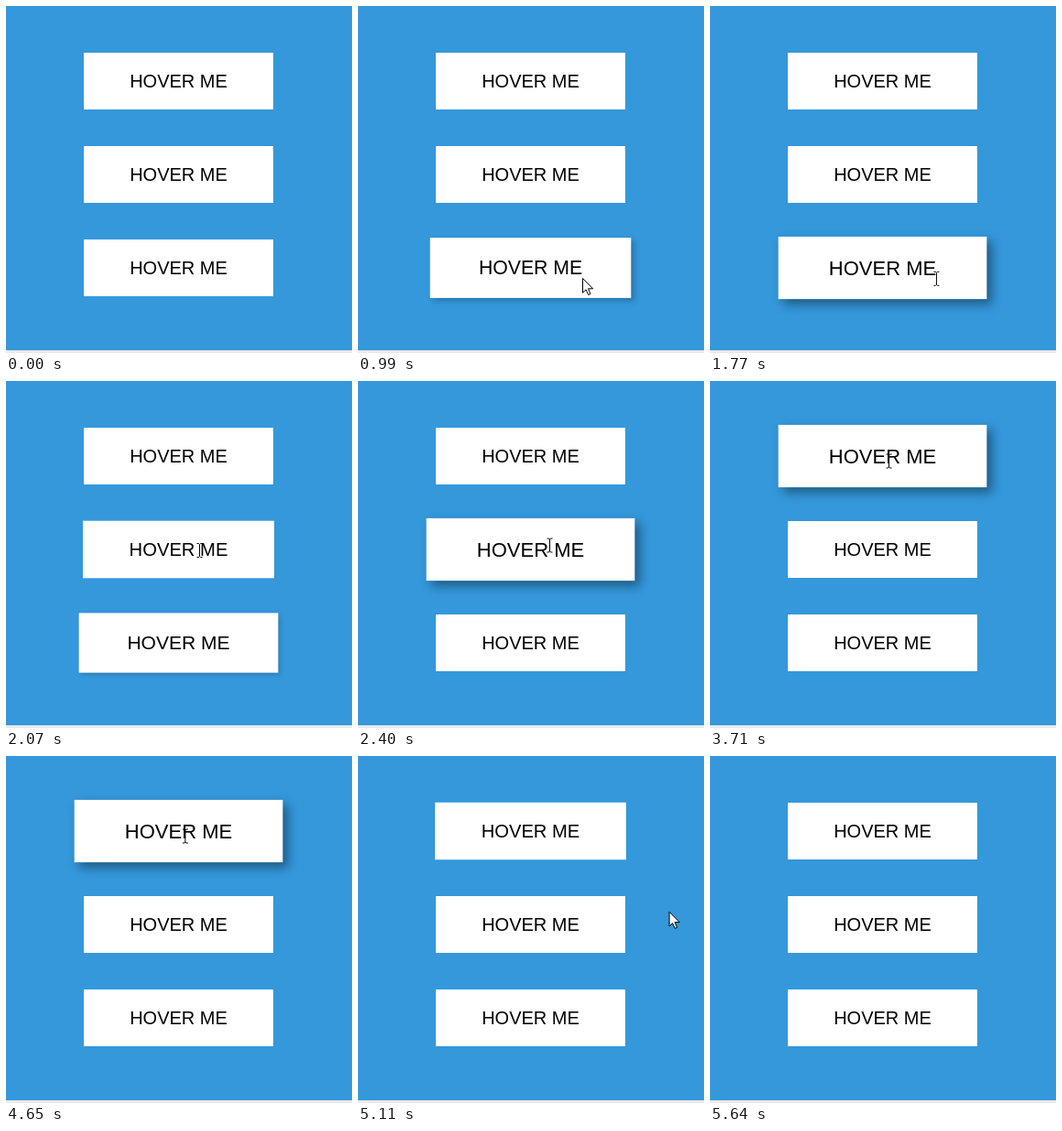
These frames come from a looping animation (378 px wide and 379 px high, 6.27 s). An HTML page:

```html
<!DOCTYPE html>
<html lang="en">
<head>
<meta charset="utf-8">
<title>Hover buttons</title>
<style>
  html, body { margin: 0; width: 100%; height: 100%; overflow: hidden; }
  body { position: relative; background: #3498db; }
  body::after { content: ""; position: absolute; top: 376px; left: 0; right: 0; height: 3px; background: #e9e9e9; }
  .button {
    position: absolute; left: 85px; width: 207px; height: 62px;
    background: #fff; color: #000; text-align: center; white-space: nowrap;
    font: 20px/62px "Liberation Sans", Arial, sans-serif;
  }
  svg { position: absolute; left: 0; top: 0; width: 378px; height: 379px; }
</style>
</head>
<body>
<div class="button" style="top:51px">HOVER ME</div>
<div class="button" style="top:153px">HOVER ME</div>
<div class="button" style="top:255px">HOVER ME</div>
<svg viewBox="0 0 378 379">
  <g id="pointer">
    <path id="arrow" d="M.5.5V16.2L4.1 12.8 6.7 18.5 9 17.5 6.5 11.8H11.6Z" fill="#fff" stroke="#000"/>
    <path id="beam" d="M-3-7.5H-1L0-6.5 1-7.5H3M0-6.5V6.5M-3 7.5H-1L0 6.5 1 7.5H3" fill="none" stroke="#000"/>
  </g>
</svg>
<script>
const LOOP = 6270, FADE = 300;

// Hover start and end per button, top to bottom
const hovers = [[3400, 4915], [2040, 3296], [885, 1986]];

// Pointer stops: time, x, y, shape used from then on
const stops = [
  [530, 333, 364, 'arrow'], [885, 283, 315, 'arrow'], [990, 245, 297, 'arrow'],
  [1290, 245, 297, 'arrow'], [1290, 247.5, 298, 'beam'],
  [1770, 247.5, 298, 'beam'], [1850, 243, 284, 'arrow'], [1986, 229, 252, 'arrow'],
  [2040, 217, 204, 'arrow'], [2060, 213, 190, 'beam'], [2070, 211.5, 185, 'beam'],
  [2320, 209.5, 179.5, 'beam'], [3100, 209.5, 179.5, 'beam'],
  [3180, 206, 172, 'arrow'], [3296, 202, 150, 'arrow'], [3410, 195, 104, 'arrow'],
  [3480, 195, 94, 'beam'], [3640, 195.5, 87.5, 'beam'], [4650, 195.5, 87.5, 'beam'],
  [4800, 248, 92, 'arrow'], [4915, 302, 110, 'arrow'], [5080, 337, 160, 'arrow'],
  [5260, 352, 217, 'arrow'], [5560, 362, 344, 'arrow'], [5640, 364, 362, 'none'],
];

const buttons = document.querySelectorAll('.button');
const pointer = document.getElementById('pointer');
const shapes = ['arrow', 'beam'].map(id => document.getElementById(id));

// The CSS "ease" curve: cubic-bezier(.25, .1, .25, 1)
function ease(x) {
  if (x <= 0) return 0;
  if (x >= 1) return 1;
  const bezier = (s, a, b) => 3 * a * s * (1 - s) ** 2 + 3 * b * s * s * (1 - s) + s ** 3;
  let low = 0, high = 1;
  for (let i = 0; i < 20; i++) {
    const mid = (low + high) / 2;
    if (bezier(mid, .25, .25) < x) low = mid; else high = mid;
  }
  return bezier(low, .1, 1);
}

function drawButton(button, amount) {
  button.style.transform = amount ? `scale(${1 + amount * .1})` : 'none';
  button.style.boxShadow = amount
    ? `${5 * amount}px ${5 * amount}px ${10 * amount}px rgba(0,0,0,${.4 * amount})`
    : 'none';
}

function drawPointer(time) {
  const next = stops.findIndex(stop => stop[0] > time);
  const visible = next > 0;
  pointer.style.display = visible ? '' : 'none';
  if (!visible) return;
  const [t0, x0, y0, shape] = stops[next - 1];
  const [t1, x1, y1] = stops[next];
  const k = (time - t0) / (t1 - t0);
  pointer.setAttribute('transform', `translate(${x0 + (x1 - x0) * k} ${y0 + (y1 - y0) * k})`);
  for (const el of shapes) el.style.display = el.id === shape ? '' : 'none';
}

function draw(time) {
  hovers.forEach(([enter, leave], i) =>
    drawButton(buttons[i], ease((time - enter) / FADE) - ease((time - leave) / FADE)));
  drawPointer(time);
}

const start = performance.now();
function tick() {
  draw((performance.now() - start) % LOOP);
  requestAnimationFrame(tick);
}
tick();
</script>
</body>
</html>
```
